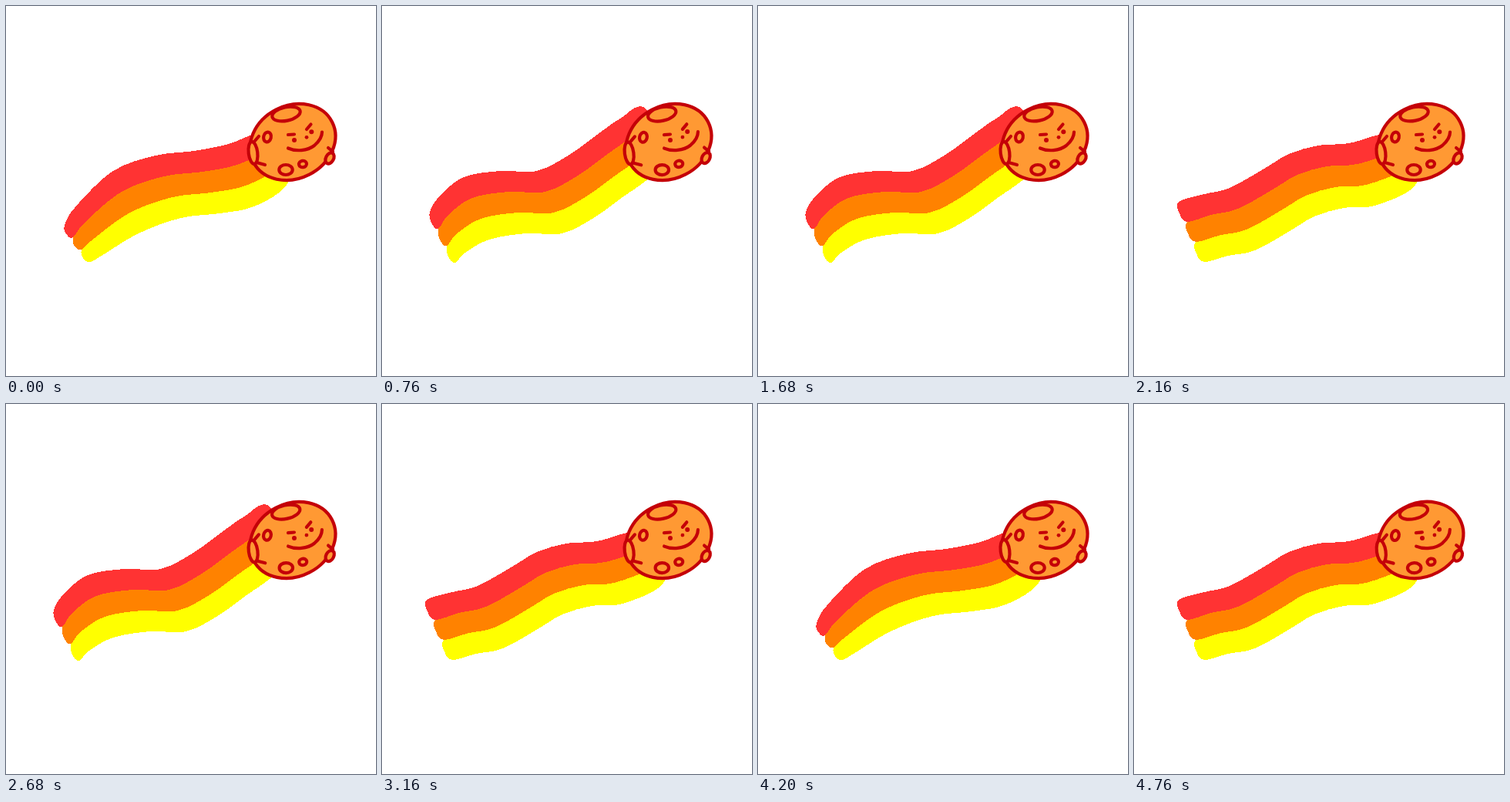
Recreate the animation shown at these times as an HTML page. Size 480 by 480 pixels, loop 4.8 s.

```html
<!DOCTYPE html>
<html lang="en">
<head>
<meta charset="utf-8">
<title>Meteor</title>
<style>
html, body { margin: 0; width: 100%; height: 100%; overflow: hidden; background: #fff; }
svg { display: block; width: 100vw; height: 100vh; }
.tail, .ball { visibility: hidden; }
.tail { shape-rendering: crispEdges; animation: tail 320ms step-end infinite; }
.ball {
  animation: ball 120ms step-end infinite;
  fill: #ff9933; stroke: #c40008; stroke-width: 4.2; stroke-linecap: round;
}
.line { fill: none; }
.dot { fill: #c40008; stroke: none; }
@keyframes tail { 0% { visibility: visible; } 25%, 100% { visibility: hidden; } }
@keyframes ball { 0% { visibility: visible; } 33.3333%, 100% { visibility: hidden; } }
</style>
</head>
<body>
<svg id="stage" viewBox="0 0 480 480"></svg>
<script>
// Closed Catmull-Rom curve
function smooth(pts) {
  const n = pts.length;
  const at = i => pts[(i + n) % n];
  const lean = (p, a, b) => [p[0] + (b[0] - a[0]) / 6, p[1] + (b[1] - a[1]) / 6];
  return 'M' + pts[0] + pts.map((p, i) =>
    `C${lean(p, at(i - 1), at(i + 1))} ${lean(at(i + 1), at(i + 2), p)} ${at(i + 1)}`).join('') + 'Z';
}

const group = (cls, delay, body) => `<g class="${cls}" style="animation-delay:${delay}ms">${body}</g>`;

// Lower bands first, each overlapped by the one above
const bands = [[1, '#ffff00'], [0, '#ff8200'], [-1, '#ff3333']];

// All edges are shifted copies of the spine between red and orange.
// fan: vertical gap between edges at the loose end
function tail(fan, spine) {
  const pts = spine.split(' ').map(p => p.split(',').map(Number));
  const last = pts.length - 1;
  const edge = (j, k) => {
    const grow = Math.min(j / 2, 1);
    const pinch = j === last ? 0.85 : 1;
    return [pts[j][0] + 11 * pinch * k, pts[j][1] + (fan + (27 - fan) * grow) * pinch * k];
  };
  const dx = pts[0][0] - pts[1][0], dy = pts[0][1] - pts[1][1];
  const push = 5 / Math.hypot(dx, dy);

  return bands.map(([k, fill]) => {
    const top = pts.map((p, j) => edge(j, k - (j && k > -1 ? 0.3 : 0)));
    const low = pts.map((p, j) => edge(j, k + 1)).reverse();
    const mid = edge(0, k + 0.5);
    const cap = [mid[0] + dx * push, mid[1] + dy * push];
    return `<path fill="${fill}" d="${smooth([cap, ...top, [372, 190], ...low])}"/>`;
  }).join('');
}

// The wave runs towards the loose end
const tails = [
  tail(16, '87,300 102,281 150,241 205,221 255,215 300,206 345,187'),
  tail(22, '73,289 86,271 117,249 165,241 212,241 254,220 290,194 320,173 350,155'),
  tail(26, '66,282 100,269 140,261 180,252 220,231 260,205 300,193 348,182'),
  tail(26, '69,280 100,271 135,263 180,238 212,219 250,208 290,205 345,188')
];

const ring = (x, y, rx, ry, turn) =>
  `<ellipse cx="${x}" cy="${y}" rx="${rx}" ry="${ry}" transform="rotate(${turn} ${x} ${y})"/>`;
const line = d => `<path class="line" d="${d}"/>`;
const dot = (x, y, r) => `<circle class="dot" cx="${x}" cy="${y}" r="${r}"/>`;

const rock =
  ring(372, 176.5, 57.3, 47.3, -27) +
  ring(363.5, 140, 18.5, 8.8, -12) +
  ring(339, 170, 4.8, 6.5, 14) +
  ring(320.5, 190.5, 5.8, 14.5, -7) +
  ring(420, 197.5, 5, 7.5, 28) +
  ring(363, 212.5, 8.7, 6.5, 0) +
  ring(385, 205, 5, 4.2, -10) +
  line('M322 176L328 169M325 203L336 206M418 184L424 189') +
  line('M366 167L374 166.5M390 160L395.5 153.5') +
  line('M366 184.5C376 189 391 188 400 181C407 175 410 170 410 163.5') +
  dot(374, 174, 3) + dot(396.3, 163.2, 3) + dot(390, 170.3, 2.4);

// A slight turn makes each redraw wobble
const balls = [0, 1, 2].map(i => `<g transform="rotate(${-0.5 * i} 372 176)">${rock}</g>`);

document.getElementById('stage').innerHTML =
  tails.map((t, i) => group('tail', i * 80 - 320, t)).join('') +
  balls.map((b, i) => group('ball', i * 40 - 120, b)).join('');
</script>
</body>
</html>
```
